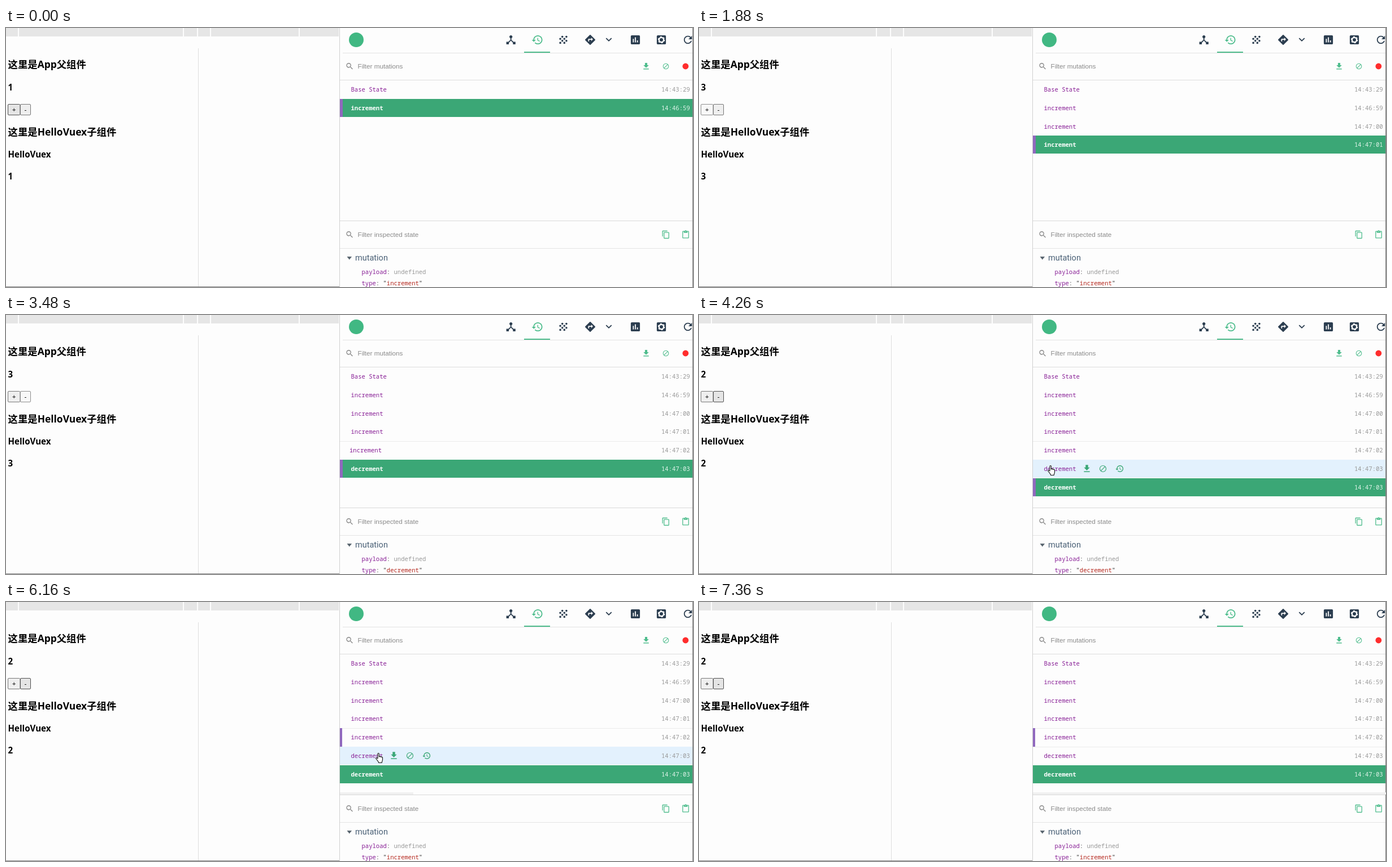
An HTML page that plays this animation: 1216x460 px, repeating every 7.89 s.

```html
<!DOCTYPE html>
<html lang="zh">
<head>
<meta charset="utf-8">
<title>Mutation history</title>
<style>
  html, body { margin: 0; width: 100%; height: 100%; overflow: hidden; background: #fdfdfd; }
  svg { display: block; width: 1216px; height: 460px; }
  rect { shape-rendering: crispEdges; }
  text { white-space: pre; }
  .page { font-family: "Noto Sans", "Noto Sans CJK SC", "Noto Sans CJK", sans-serif; font-weight: 700; }
  .h2 { font-size: 17.4px; }
  .h3 { font-size: 15.1px; }
  .ui { font: 11.7px "Liberation Sans", Arial, sans-serif; }
  .mono { font: 10.55px "Noto Sans Mono", "DejaVu Sans Mono", monospace; }
  .bold { font-weight: 700; }
</style>
</head>
<body>
<svg viewBox="0 0 1216 460">
  <g id="base"></g>
  <g id="live"></g>
</svg>
<script>
const LOOP = 7890;
const INK = '#2c3e50', GREEN = '#3ba776', MINT = '#4fbd8d', PURPLE = '#881f96', BAR = '#9068be';

const ICONS = {
  hub: 'M17 16l-4-4V8.82C14.16 8.4 15 7.3 15 6c0-1.66-1.34-3-3-3S9 4.34 9 6c0 1.3.84 2.4 2 2.82V12l-4 4H3v5h5v-3.05l4-4.2 4 4.2V21h5v-5h-4z',
  history: 'M13 3c-4.97 0-9 4.03-9 9H1l3.89 3.89.07.14L9 12H6c0-3.87 3.13-7 7-7s7 3.13 7 7-3.13 7-7 7c-1.93 0-3.68-.79-4.94-2.06l-1.42 1.42C8.27 19.99 10.51 21 13 21c4.97 0 9-4.03 9-9s-4.03-9-9-9zm-1 5v5l4.28 2.54.72-1.21-3.5-2.08V8H12z',
  route: 'M21.71 11.29l-9-9c-.39-.39-1.02-.39-1.41 0l-9 9c-.39.39-.39 1.02 0 1.41l9 9c.39.39 1.02.39 1.41 0l9-9c.39-.38.39-1.01 0-1.41zM14 14.5V12h-4v3H8v-4c0-.55.45-1 1-1h5V7.5l3.5 3.5-3.5 3.5z',
  more: 'M16.59 8.59L12 13.17 7.41 8.59 6 10l6 6 6-6z',
  chart: 'M19 3H5c-1.1 0-2 .9-2 2v14c0 1.1.9 2 2 2h14c1.1 0 2-.9 2-2V5c0-1.1-.9-2-2-2zM9 17H7v-7h2v7zm4 0h-2V7h2v10zm4 0h-2v-4h2v4z',
  box: 'M19 3H5c-1.1 0-2 .9-2 2v14c0 1.1.9 2 2 2h14c1.1 0 2-.9 2-2V5c0-1.1-.9-2-2-2z',
  refresh: 'M17.65 6.35C16.2 4.9 14.21 4 12 4c-4.42 0-7.99 3.58-7.99 8s3.57 8 7.99 8c3.73 0 6.84-2.55 7.73-6h-2.08c-.82 2.33-3.04 4-5.65 4-3.31 0-6-2.69-6-6s2.69-6 6-6c1.66 0 3.14.69 4.22 1.78L13 11h7V4l-2.35 2.35z',
  search: 'M15.5 14h-.79l-.28-.27A6.47 6.47 0 0 0 16 9.5 6.5 6.5 0 1 0 9.5 16c1.61 0 3.09-.59 4.23-1.57l.27.28v.79l5 4.99L20.49 19l-4.99-5zm-6 0C7.01 14 5 11.99 5 9.5S7.01 5 9.5 5 14 7.01 14 9.5 11.99 14 9.5 14z',
  save: 'M19 9h-4V3H9v6H5l7 7 7-7zM5 18v2h14v-2H5z',
  block: 'M12 2a10 10 0 1 0 0 20 10 10 0 0 0 0-20zM4 12c0-4.42 3.58-8 8-8 1.85 0 3.55.63 4.9 1.69L5.69 16.9A7.9 7.9 0 0 1 4 12zm8 8c-1.85 0-3.55-.63-4.9-1.69L18.31 7.1A7.9 7.9 0 0 1 20 12c0 4.42-3.58 8-8 8z',
  copy: 'M16 1H4c-1.1 0-2 .9-2 2v14h2V3h12V1zm3 4H8c-1.1 0-2 .9-2 2v14c0 1.1.9 2 2 2h11c1.1 0 2-.9 2-2V7c0-1.1-.9-2-2-2zm0 16H8V7h11v14z',
  paste: 'M19 2h-4.18C14.4.84 13.3 0 12 0c-1.3 0-2.4.84-2.82 2H5c-1.1 0-2 .9-2 2v16c0 1.1.9 2 2 2h14c1.1 0 2-.9 2-2V4c0-1.1-.9-2-2-2zm-7 0c.55 0 1 .45 1 1s-.45 1-1 1-1-.45-1-1 .45-1 1-1zm7 18H5V4h2v3h10V4h2v16z'
};
const HAND = 'M4 10V1.8c0-1.8 2.4-1.8 2.4 0V7c.2-1.2 2-1.1 2.1.2.3-1 1.9-.9 2 .4.4-.8 2-.6 2 .8V12c0 2-1.3 3-1.3 5.5H5.6c0-2-2.2-4-4.6-7-.9-1.4.9-2.3 1.8-1.2z';

const rect = (x, y, w, h, fill) => `<rect x="${x}" y="${y}" width="${w}" height="${h}" fill="${fill}"/>`;
const text = (x, y, cls, fill, s) => `<text x="${x}" y="${y}" class="${cls}" fill="${fill}">${s}</text>`;
const dot = (x, y, r, fill) => `<circle cx="${x}" cy="${y}" r="${r}" fill="${fill}"/>`;
const place = (x, y, k, body) => `<g transform="translate(${x} ${y}) scale(${k}) translate(-12 -12)">${body}</g>`;
const icon = (name, x, y, k, fill) => place(x, y, k, `<path d="${ICONS[name]}" fill="${fill}"/>`);

function drawBase() {
  const grain = [[10, 14], [6, 10], [6, 18], [18, 6], [14, 18], [18, 14], [14, 10], [10, 6]];
  const gear = `<circle cx="12" cy="12" r="4.6" fill="none" stroke="#fdfdfd" stroke-width="2.6"/>` +
    `<circle cx="12" cy="12" r="6" fill="none" stroke="#fdfdfd" stroke-width="1.8" stroke-dasharray="3.1 3.18"/>`;
  return [
    rect(0, 0, 589, 15, '#e6e6e6'),
    ...[21, 313, 338, 361, 518].map(x => rect(x, 0, 2, 15, '#fdfdfd')),
    rect(340, 36, 1, 423, '#dedede'),
    rect(0, 459, 590, 1, '#858585'),
    rect(590, 0, 1, 460, '#cfcfcf'),
    text(3.5, 71, 'page h2', '#000', '这里是App父组件'),
    text(3.5, 191, 'page h2', '#000', '这里是HelloVuex子组件'),
    text(3.5, 230, 'page h3', '#000', 'HelloVuex'),

    dot(620, 21, 13, '#41b883'),
    rect(596, 44, 620, 1, '#e2e2e2'),
    rect(917, 42, 46, 2, MINT),
    icon('hub', 893.7, 21, .9, INK),
    icon('history', 940.5, 21, .9, MINT),
    place(986.5, 21, .9, grain.map(([x, y]) => dot(x, y, 2, INK)).join('')),
    icon('route', 1034, 21, .9, INK),
    icon('more', 1067, 20.5, .9, INK),
    icon('chart', 1114, 21, .9, INK),
    icon('box', 1160, 21, .9, INK),
    place(1160, 21, .9, gear),
    icon('refresh', 1207, 21, .9, INK),

    icon('search', 608.3, 68, .66, '#8a8a8a'),
    text(622.5, 72, 'ui', '#8a8a8a', 'Filter mutations'),
    icon('save', 1133, 68, .68, MINT),
    icon('block', 1168, 68, .53, MINT),
    dot(1202.8, 68, 5.4, '#ff2d2d'),
    rect(591, 92, 625, 1, '#dcdcdc'),

    rect(591, 342, 625, 1, '#dadada'),
    icon('search', 608.3, 367, .66, '#8a8a8a'),
    text(622.5, 371, 'ui', '#8a8a8a', 'Filter inspected state'),
    icon('copy', 1168, 367, .65, MINT),
    icon('paste', 1203, 367, .65, MINT),
    rect(591, 391, 625, 1, '#e4e4e4'),
    '<path d="M603.5 406h8.6l-4.3 5.4z" fill="#5a6670"/>',
    `<text x="618" y="413" fill="#4a6076" style="font:14.5px Roboto,sans-serif">mutation</text>`,
    text(629.5, 437, 'mono', PURPLE, 'payload<tspan fill="#555">:</tspan><tspan fill="#999"> undefined</tspan>'),
    rect(1215, 0, 1, 460, '#7d7d7d')
  ].join('');
}

const ROWS = [
  ['Base State', '14:43:29'], ['increment', '14:46:59'], ['increment', '14:47:00'],
  ['increment', '14:47:01'], ['increment', '14:47:02'], ['decrement', '14:47:03'], ['decrement', '14:47:03']
];
const FACE = { idle: ['#efefef', '#767676'], hover: ['#e5e5e5', '#4f4f4f'], down: ['#f8f8f8', '#8d8d8d'] };

// Each step overrides part of the state from its time onward.
const STEPS = [
  [0, { n: 1, rows: 2, bar: 1, plus: 'hover', minus: 'idle', type: 'increment', over: -1, hand: null, strip: 0, shift: 0 }],
  [250, { n: 2, rows: 3, bar: 2, plus: 'down' }],
  [400, { plus: 'hover' }],
  [1330, { plus: 'down' }],
  [1450, { n: 3, rows: 4, bar: 3 }],
  [1570, { plus: 'hover' }],
  [1880, { plus: 'down' }],
  [2030, { n: 4 }],
  [2180, { rows: 5, bar: 4 }],
  [2300, { plus: 'hover' }],
  [3480, { n: 3, rows: 6, bar: 5, plus: 'idle', minus: 'down', type: 'decrement', shift: -2.5 }],
  [3600, { minus: 'hover', shift: 0 }],
  [3750, { minus: 'down' }],
  [3900, { n: 2 }],
  [4020, { rows: 7, bar: 6, minus: 'hover' }],
  [4260, { over: 5, hand: [617, 267] }],
  [4410, { hand: [626, 260] }],
  [4530, { over: 4, hand: [636, 246] }],
  [4650, { hand: [640, 239] }],
  [4800, { hand: [640, 240] }],
  [4950, { hand: [638, 242] }],
  [5070, { hand: [637, 241] }],
  [5340, { hand: [637, 240] }],
  [5590, { bar: 4, type: 'increment', strip: 130 }],
  [5890, { hand: [637, 239] }],
  [6040, { hand: [645, 252] }],
  [6160, { over: 5, hand: [654, 268] }],
  [6430, { hand: [654, 269] }],
  [6580, { hand: [655, 272] }],
  [6730, { over: -1, hand: [658, 291] }],
  [6850, { hand: [664, 309] }],
  [6970, { hand: null, strip: 625 }]
];
let acc = {};
const STATES = STEPS.map(([, change]) => acc = { ...acc, ...change });

const rowTop = i => 93 + 32.8 * i;

function drawButton(x, w, label, face) {
  const [fill, edge] = FACE[face];
  return `<rect x="${x}" y="135.5" width="${w}" height="19" rx="1.5" fill="${fill}" stroke="${edge}" style="shape-rendering:auto"/>` +
    `<text x="${x + w / 2}" y="149" class="ui" text-anchor="middle">${label}</text>`;
}

function drawRow(i, s) {
  const [name, time] = ROWS[i];
  const y = Math.round(rowTop(i)), base = rowTop(i) + 20;
  const picked = i === s.rows - 1, over = i === s.over;
  const x = 610.5 + (i === 4 ? s.shift : 0);
  let out = '';
  if (picked) out += rect(591, y, 624, 32, GREEN);
  else if (over) out += rect(591, y, 624, 32, '#e3f1fd');
  else if (i > 2 && (i === s.rows - 2 || i === 4 && s.rows > 5)) out += rect(591, y, 624, 1, '#ebebeb');
  if (i === s.bar) out += rect(591, y, picked ? 5 : 4, picked ? 32 : 33, BAR);
  out += text(x, base, picked ? 'mono bold' : 'mono', picked ? '#fff' : PURPLE, name);
  out += text(1160, base, 'mono', picked ? '#e2f4eb' : '#999', time);
  if (over) {
    const c = y + 16;
    out += icon('save', 686.5, c, .74, GREEN) + icon('block', 715, c, .61, GREEN) + icon('history', 744.5, c, .66, GREEN);
  }
  return out;
}

function drawLive(s) {
  let out = text(3.5, 110.5, 'page h3', '#000', s.n) + text(3.5, 268.5, 'page h3', '#000', s.n);
  out += drawButton(3.5, 21.5, '+', s.plus) + drawButton(25.5, 18, '-', s.minus);
  for (let i = 0; i < s.rows; i++) out += drawRow(i, s);
  if (s.strip) out += rect(591, 338, s.strip, 4, '#f0f0f0');
  out += text(629.5, 456.5, 'mono', PURPLE, `type<tspan fill="#555">:</tspan> <tspan fill="#b5281e"><tspan fill="#333">"</tspan>${s.type}<tspan fill="#333">"</tspan></tspan>`);
  if (s.hand) out += `<path transform="translate(${s.hand})" d="${HAND}" fill="#fff" stroke="#111" stroke-width="1.1" stroke-linejoin="round"/>`;
  return out;
}

document.getElementById('base').innerHTML = drawBase();
const live = document.getElementById('live');
const start = performance.now();
let shown = -1;

function tick() {
  const t = (performance.now() - start) % LOOP;
  const k = STEPS.findLastIndex(([at]) => at <= t);
  if (k !== shown) {
    shown = k;
    live.innerHTML = drawLive(STATES[k]);
  }
  requestAnimationFrame(tick);
}
tick();
</script>
</body>
</html>
```
